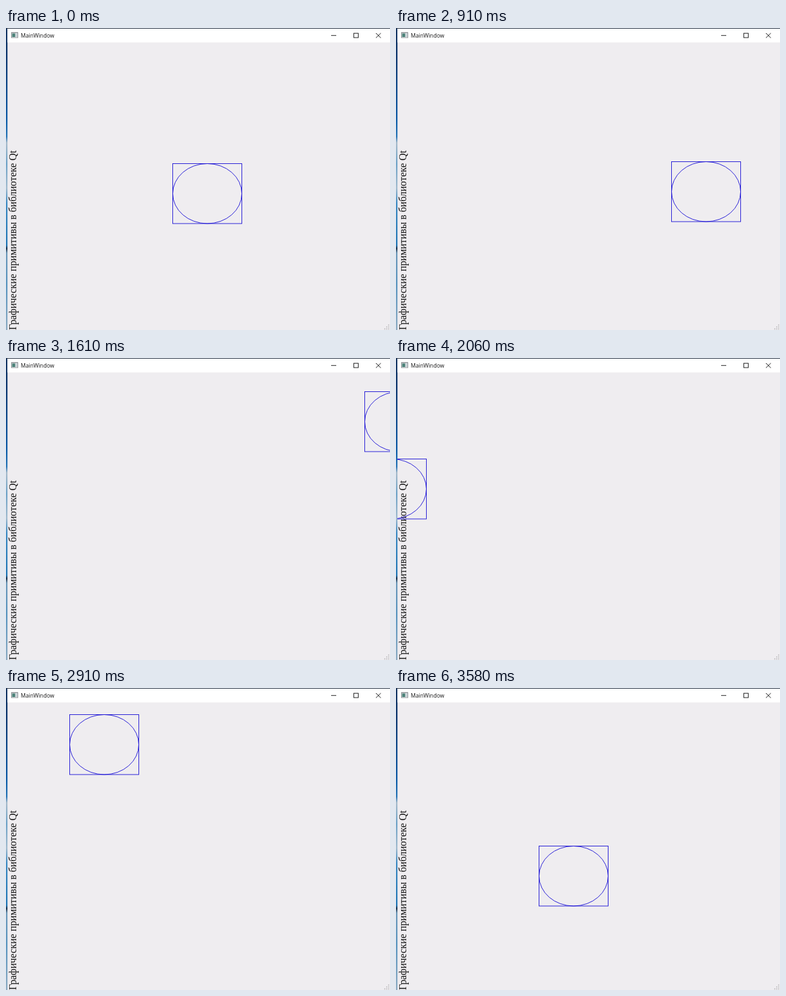
Animation, 600 px wide and 471 px high, one loop 3610 ms. Source, as an HTML page with a canvas:

```html
<!DOCTYPE html>
<html lang="ru">
<head>
<meta charset="utf-8">
<title>MainWindow</title>
<style>
  html, body { margin: 0; width: 100%; height: 100%; overflow: hidden; background: #efedf0; }
  canvas { display: block; }
</style>
</head>
<body>
<canvas id="stage" width="600" height="471"></canvas>
<script>
const ctx = document.getElementById('stage').getContext('2d');
const LOOP = 3610;
const WIDTH = 600, HEIGHT = 471, EDGE = 2;
const WRAP = 705.5;
const BLUE = '#2118d6';

// [time in ms, distance travelled to the right, wave phase in degrees]
const PATH = [
  [0, 260.7, -129.4],
  [420, 340.4, -11.1],
  [910, 430.3, 127.4],
  [1610, 560.8, 328.2],
  [2060, 644.8, 457.5],
  [2910, 805.4, 702.5],
  [3270, 872.7, 806],
  [3580, 928.8, 884.3]
];

function rect(color, x, y, w, h) {
  ctx.fillStyle = color;
  ctx.fillRect(x, y, w, h);
}

function line(...points) {
  ctx.beginPath();
  for (const [x, y] of points) ctx.lineTo(x, y);
  ctx.stroke();
}

// The desktop shows through as a thin strip beside the window
function drawDesktop() {
  const strip = ctx.createLinearGradient(0, 0, 0, HEIGHT);
  const stops = [
    [0, '#12335f'], [0.1, '#0b3872'], [0.3, '#0d5ca8'], [0.36, '#2b78b8'],
    [0.38, '#a9bccb'], [0.45, '#6fa3c8'], [0.53, '#a3bccf'], [0.58, '#3f8cc4'],
    [0.72, '#2478b6'], [0.73, '#17304a'], [0.745, '#6f9abb'], [0.85, '#5a95c0'], [1, '#8fadc4']
  ];
  for (const [at, color] of stops) strip.addColorStop(at, color);
  rect(strip, 0, 0, EDGE + 0.3, HEIGHT);
}

function drawTitleBar() {
  rect('#ffffff', EDGE + 0.3, 0, WIDTH, 22.5);
  rect('#2c3648', 0, 0, WIDTH, 1);

  rect('#8d9296', 8, 6.5, 11, 9);
  rect('#f4f6f6', 9, 8, 9, 6.5);
  rect('#4b8279', 9.5, 8.5, 5, 5.5);
  rect('#b9c4cc', 15.5, 8.5, 2, 5.5);

  ctx.fillStyle = '#161616';
  ctx.font = '8.6px "Open Sans", "Noto Sans", sans-serif';
  ctx.fillText('MainWindow', 23, 15);

  ctx.strokeStyle = '#202020';
  ctx.lineWidth = 1;
  line([508, 11.7], [516, 11.7]);
  ctx.strokeRect(543.4, 8.2, 7, 6.8);
  line([578, 8], [585.7, 15.4]);
  line([585.7, 8], [578, 15.4]);
}

function drawCaption() {
  ctx.save();
  ctx.translate(16.3, 471);
  ctx.rotate(-Math.PI / 2);
  ctx.fillStyle = '#141414';
  ctx.font = '15.85px "Liberation Serif", "Noto Serif", serif';
  ctx.fillText('Графические примитивы в библиотеке Qt', 0, 0);
  ctx.restore();
}

function drawGrip() {
  for (let row = 0; row < 3; row++)
    for (let col = 2 - row; col < 3; col++)
      rect('#b9b7ba', 591 + col * 3, 462.5 + row * 3, 1.6, 1.6);
}

function positionAt(time) {
  let i = 0;
  while (i < PATH.length - 2 && time > PATH[i + 1][0]) i++;
  const [a, b] = [PATH[i], PATH[i + 1]];
  const k = (time - a[0]) / (b[0] - a[0]);
  const mix = n => a[n] + (b[n] - a[n]) * k;
  const travelled = mix(1);
  return {
    x: travelled > WIDTH ? travelled - WRAP : travelled,
    y: 143.6 - 106.8 * Math.cos(mix(2) * Math.PI / 180)
  };
}

function drawFigure({ x, y }) {
  const w = 108, h = 93.5;
  ctx.save();
  ctx.beginPath();
  ctx.rect(EDGE, 22, WIDTH, HEIGHT);
  ctx.clip();
  ctx.translate(Math.floor(x) + 0.5, Math.floor(y) + 0.5);
  ctx.strokeStyle = BLUE;
  ctx.lineWidth = 0.95;
  ctx.strokeRect(0, 0, w, h);
  ctx.beginPath();
  ctx.ellipse(w / 2, h / 2, w / 2, h / 2, 0, 0, Math.PI * 2);
  ctx.stroke();
  ctx.restore();
}

// Motion advances in steps of about 30 ms, aligned to 10 ms ticks
function stepTime(time) {
  const step = Math.floor((Math.floor(time / 10) + 0.5) / 3.03);
  return Math.round(step * 3.03) * 10;
}

function draw(time) {
  rect('#efedf0', 0, 0, WIDTH, HEIGHT);
  drawDesktop();
  drawTitleBar();
  drawCaption();
  drawGrip();
  drawFigure(positionAt(stepTime(time)));
}

const start = performance.now();
function tick() {
  draw((performance.now() - start) % LOOP);
  requestAnimationFrame(tick);
}
tick();
</script>
</body>
</html>
```
